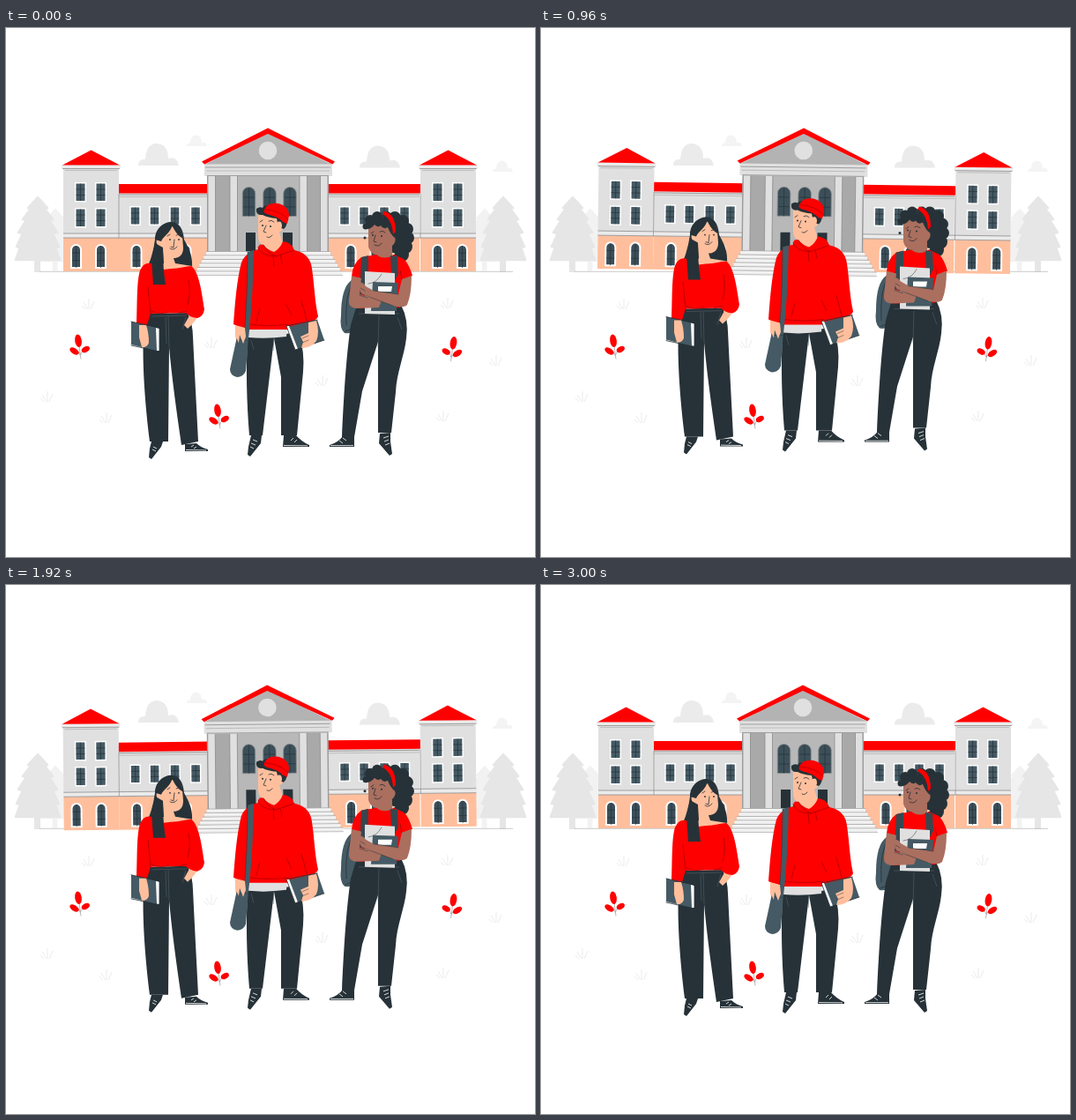
Write an HTML page that moves like this. It is 600x600 px and loops after 3040 ms.

```html
<!DOCTYPE html>
<html lang="en">
<head>
<meta charset="utf-8">
<title>Students on campus</title>
<style>
  html, body { margin: 0; width: 100%; height: 100%; overflow: hidden; background: #fff; }
  svg { display: block; width: 100%; height: 100%; }
  .ink { fill: #263238; }
  .slate { fill: #455a64; }
  .red { fill: #f00; }
  .skin { fill: #ffbf9d; }
  .brown { fill: #aa6f5f; }
  .pale { fill: #e0e0e0; }
  .white { fill: #fff; }
  .line { fill: none; stroke: #263238; stroke-width: .8; stroke-linecap: round; stroke-linejoin: round; }
  .thin { stroke-width: .5; }
  .fold { fill: none; stroke: #a30000; stroke-width: .7; stroke-linecap: round; }
  .lace { fill: none; stroke: #fff; stroke-width: .8; }
  .seam { fill: none; stroke: #53616a; stroke-width: .6; }
</style>
</head>
<body>
<svg viewBox="0 0 600 600">
  <defs>
    <g id="cloud"><path d="M150 156Q150 148 158 149Q159 131 171 131Q184 132 184 148Q194 145 196 156Z"/></g>
    <g id="tuft"><path d="M-1 6L-6 -2M0 6L0 -6M2 6L6 -3M-4 6L-8 2" fill="none" stroke="#e6e6e6" stroke-width=".8"/></g>
    <g id="sprout">
      <path d="M-1 0Q0 8 1 15M-5 6Q0 7 0 11M6 5Q1 6 1 10" fill="none" stroke="#999" stroke-width=".7"/>
      <ellipse class="red" cx="-2" cy="-5.7" rx="3.8" ry="7.3" transform="rotate(-8 -2 -5.7)"/>
      <ellipse class="red" cx="-6.5" cy="6" rx="5.8" ry="3.3" transform="rotate(32 -6.5 6)"/>
      <ellipse class="red" cx="6.3" cy="4" rx="4.9" ry="3.1" transform="rotate(-30 6.3 4)"/>
    </g>
  </defs>

  <g id="scenery"></g>
  <g id="building"></g>

  <g id="people">
    <g id="longHair">
      <path class="ink" d="M169 240C169 228 178 220 188 220C197 221 201 228 202 240C206 248 212 256 211 272L198 274L170 276L161 270Q167 256 169 240Z"/>
      <path class="skin" d="M176 236C180 230 186 225 190 225C196 225 200 231 200 236L201 249C201 257 197 261 190 261L192 267L211 270L206 280L172 280L167 271L179 267L178 250C169 250 168 235 176 237Z"/>
      <path class="ink" d="M189 222C187 233 179 235 176 242L169 240C171 227 179 219 189 222ZM188 222C195 223 200 229 201 239C196 236 190 230 188 222Z"/>
      <path class="line" d="M183 236L186 234M193 235Q195 233 198 236M191 240L190 249L187 248M186 250Q190 253 194 248"/>
      <circle class="ink" cx="186" cy="240" r=".9"/><circle class="ink" cx="196" cy="240" r=".9"/>
      <path class="ink" d="M163 324L206 323Q212 337 212 350C214 392 216 430 218 469L199 473C193 432 188 395 185 362L184 469L163 469C158 430 153 370 157 334Z"/>
      <path class="seam" d="M165 327L205 326M184 327L185 362M181 328L182 358M204 328L200 342"/>
      <path class="skin" d="M202 337L211 321L218 326Q215 333 206 341Z"/>
      <path class="red" d="M152 275Q156 265 165 267C172 276 180 274 187 273C197 273 204 270 210 270C219 276 222 300 225 319Q224 327 217 329Q207 328 202 321L206 312L205 323L164 324L160 337L148 336C149 313 148 288 152 275Z"/>
      <path class="fold" d="M164 324L161 294M206 314Q210 299 207 286M165 321Q175 326 184 322M205 321L196 323"/>
      <path class="ink" d="M169 244L178 249Q178 274 181 291L167 291L165 262Z"/>
      <path class="slate" d="M142 333L171 340L173 367L142 359Z"/>
      <path class="white" d="M170 340L174 341L174 366L171 366Z"/>
      <path class="line" d="M142 333L174 340L174 367L142 360"/>
      <path class="skin" d="M151 337L159 337Q162 346 162 357Q160 363 154 362L151 351Z"/>
      <path class="ink" d="M165 469L178 469L176 475L165 489L162 487L163 477ZM203 472L216 471Q221 476 229 478L229 480L203 480Z"/>
      <path class="lace" d="M167 475L171 477M166 478L170 480M210 475L213 473M213 477L216 475M204 478.5L227 479"/>
    </g>

    <g id="beanie">
      <path class="ink" d="M274 349L332 346Q339 367 337 390L330 462L312 462L312 396L304 352L291 462L276 462C273 425 272 386 274 349Z"/>
      <path class="seam" d="M304 352L303 366M278 354L281 365"/>
      <path class="pale" d="M275 340L319 340L318 350Q296 353 275 351Z"/>
      <path class="skin" d="M286 208L308 212Q316 215 315 225Q314 231 310 231L315 249Q305 261 293 250L292 246Q286 245 286 235Z"/>
      <path class="skin" d="M260 337L271 339L272 349L268 362Q260 357 260 348Z"/>
      <path class="red" d="M286 249Q287 244 292 246Q297 252 304 254Q311 250 314 242Q324 243 327 252C339 254 346 262 347 273C350 293 350 309 354 327Q353 332 342 334L338 338L319 342L276 342L275 334L270 342L258 336C260 309 262 285 267 266Q271 255 286 251Z"/>
      <path class="fold" d="M286 249Q289 259 306 259L327 252M292 246Q296 255 306 259M303 258L304 270M311 257L313 267M274 329L278 302M341 332Q338 319 335 309M276 336Q298 339 320 336M288 318L284 333M318 314L324 326"/>
      <path class="slate" d="M274 254L281 252Q280 310 275 352L270 352Q274 305 274 254Z"/>
      <path class="slate" d="M262 350Q267 345 275 350L272 389Q269 396 262 396Q254 394 254 387Z"/>
      <path class="line thin" d="M274 254Q274 305 270 351M262 354L274 354"/>
      <path class="skin" d="M260 337L271 340L272 350L269 358L265 348L264 357L260 349Z"/>
      <path class="slate" d="M320 339L353 331L361 354L328 365Z"/>
      <path class="white" d="M318 338L321 338L331 364L328 365Z"/>
      <path class="line" d="M353 331L318 338L328 365L361 354"/>
      <path class="skin" d="M343 334L352 332Q356 345 352 355Q346 363 335 363L337 356L334 350L343 346Z"/>
      <path class="line thin" d="M336 352L343 349M336 357L343 354"/>
      <path class="ink" d="M298 207L318 214Q320 224 315 228L309 226L307 216Q297 215 291 212Q283 213 284 205Q288 202 291 204Q293 200 299 202Z"/>
      <path class="skin" d="M308 220Q313 218 313 225Q312 230 308 229Z"/>
      <path class="red" d="M293 206Q297 197 309 199Q321 202 321 213L319 222L314 220Q309 214 296 211Q291 209 293 206Z"/>
      <path class="fold" d="M294 206Q311 207 320 217"/>
      <path class="line" d="M288 220L291 218M298 219Q301 217 304 220M295 224L292 231L295 232M296 237Q299 239 302 235"/>
      <circle class="ink" cx="291" cy="224" r="1"/><circle class="ink" cx="300" cy="225" r="1"/>
      <path class="ink" d="M278 462L290 462L289 471L277 486L274 484L275 475ZM315 462L329 462Q335 469 344 473L344 475L314 475Z"/>
      <path class="lace" d="M280 467L285 469M278 471L283 473M277 475L281 477M323 468L326 465M327 470L330 467M315 473.5L342 473.8"/>
    </g>

    <g id="curls">
      <g id="hair" class="ink"></g>
      <path class="slate" d="M392 286Q380 294 380 326Q378 341 384 346Q395 348 402 337L406 295Z"/>
      <path class="line" d="M394 288Q384 302 386 337M385 344Q394 342 401 330"/>
      <path class="brown" d="M411 225Q423 217 434 225L440 235Q444 242 438 247L438 259Q440 269 429 269Q421 269 421 258Q413 256 411 248Z"/>
      <path class="ink" d="M410 228Q407 219 417 216Q431 213 439 221L441 238Q436 234 433 226Q428 229 425 224Q422 227 418 223Q414 228 410 228Z"/>
      <path class="red" d="M429 208Q442 211 442 231L439 234Q438 217 427 211Z"/>
      <path class="line" d="M414 233L417 231M424 231Q427 229 430 232M419 235L417 242L420 243M418 246Q423 249 426 244"/>
      <circle class="ink" cx="416" cy="235" r="1"/><circle class="ink" cx="426" cy="236" r="1"/>
      <path class="ink" d="M398 314L448 314Q457 331 454 352C452 371 443 391 442 413L437 459L422 459L422 356L404 412L395 464L381 464C383 418 386 371 391 337Z"/>
      <path class="seam" d="M423 326L422 362M400 324L446 324M444 328L449 342"/>
      <path class="red" d="M403 260L420 257Q429 264 440 257L451 262Q457 267 461 281L450 286L447 317L400 318L402 284L392 282Q393 267 403 260Z"/>
      <path class="fold" d="M402 283L404 273M449 285L447 275"/>
      <path d="M403 260L411 258L411 278L404 302L401 302ZM436 258L444 259L445 279L439 290L437 280Z" fill="#37474f"/>
      <path class="pale" d="M407 276L441 278L441 325L407 324Z"/>
      <path class="line thin" d="M411 290Q421 289 426 279"/>
      <path class="slate" d="M416 288L445 289L443 321L414 321Z"/>
      <path class="white" d="M422 293L438 293L437 299L422 299Z"/>
      <path class="brown" d="M392 281L403 284L401 302L426 309L423 317L397 318Q388 317 389 309Z"/>
      <path class="brown" d="M449 285L460 281Q460 302 455 314Q451 318 439 315L404 302Q399 296 401 289Q405 288 408 293L417 298L445 302Z"/>
      <path class="line thin" d="M404 302L439 315M402 295L407 298M401 303L410 306M417 298L445 302"/>
      <path class="ink" d="M382 463L395 463L395 475L367 475L367 473Q377 470 382 463ZM424 460L436 459L436 469L438 483L435 485L423 471Z"/>
      <path class="lace" d="M382 465L386 468M378 468L382 471M368 473.6L394 473.6M428 465L434 463M429 469L434 467M430 473L435 471"/>
    </g>
  </g>
</svg>
<script>
const $ = id => document.getElementById(id);
const shape = (d, fill, extra = '') => `<path d="${d}" fill="${fill}" ${extra}/>`;
const box = (x, y, w, h, fill) => `<rect x="${x}" y="${y}" width="${w}" height="${h}" fill="${fill}"/>`;
const rule = (x1, x2, y, color = '#8c8c8c', width = .8) =>
  shape(`M${x1} ${y}H${x2}`, 'none', `stroke="${color}" stroke-width="${width}"`);
const use = (id, x, y, extra = '', flip = 1) =>
  `<use href="#${id}" transform="translate(${x} ${y}) scale(${flip} 1)" ${extra}/>`;

function tree(x, y, scale, color) {
  const half = [[0, 0], [11, 12], [8, 13], [17, 25], [13, 26], [22, 40], [17, 41], [24, 56], [20, 57], [25, 71]];
  const left = half.map(([w, h]) => [-w, h]), right = [...half].reverse();
  return `<g transform="translate(${x} ${y}) scale(${scale})">` +
    shape('M' + left.concat(right).join('L') + 'Z', color, `stroke="${color}" stroke-width="2.5" stroke-linejoin="round"`) +
    box(-4, 70, 7, 15, color) + '</g>';
}

function windowPane(cx, y, w = 10, h = 19.5) {
  return box(cx - w / 2 - 1.5, y - 1.5, w + 3, h + 3, '#fff') + box(cx - w / 2, y, w, h, '#455a64') +
    shape(`M${cx} ${y}v${h}M${cx - w / 2} ${y + h / 3}h${w}m${-w} ${h / 3}h${w}`, 'none', 'stroke="#263238" stroke-width=".7"');
}

function archPane(cx, y, w, h, frame, border = 2) {
  const r = w / 2;
  return shape(`M${cx - r} ${y + h}V${y + r}a${r} ${r} 0 0 1 ${w} 0V${y + h}Z`, '#3c4f59', `stroke="${frame}" stroke-width="${border}"`) +
    shape(`M${cx} ${y + 1}V${y + h}M${cx - r + 1} ${y + h * .35}h${w - 2}m${2 - w} ${h * .33}h${w - 2}`, 'none', 'stroke="#263238" stroke-width=".7"');
}

function tower(x) {
  let s = box(x, 158, 63, 80, '#e0e0e0') + box(x, 238, 63, 38, '#ffbf9d') +
    box(x - 2, 155, 67, 4, '#ececec') + rule(x - 1, x + 64, 159.5) + rule(x + 2, x + 61, 161.5, '#b5b5b5') +
    shape(`M${x - 1} 155.5L${x + 31.5} 138.5L${x + 64} 155.5Z`, '#f00');
  for (const y of [176.5, 205.5]) for (const dx of [19.5, 42.5]) s += windowPane(x + dx, y);
  return s;
}

function wing(x, panes, arches) {
  return box(x, 186, 104, 52, '#e0e0e0') + box(x, 238, 104, 38, '#ffbf9d') +
    shape(`M${x} 177H${x + 105}L${x + 107} 187.5H${x - 2}Z`, '#f00') + rule(x, x + 104, 189) + rule(x, x + 104, 191.5, '#b5b5b5') +
    panes.map(cx => windowPane(cx, 203.5, 9.5, 19)).join('') +
    arches.map(cx => archPane(cx, 246, 11, 26, '#fff')).join('');
}

function hall() {
  let s = box(228, 166, 138, 88, '#a9a9a9') + box(263, 168, 70, 86, '#b8b8b8');
  for (const x of [229, 254, 333, 356.5])
    s += box(x, 168, 8.5, 86, '#e0e0e0') + shape(`M${x} 168v86m8.5 -86v86`, 'none', 'stroke="#858585" stroke-width=".7"');
  for (const cx of [275.5, 299, 322]) s += archPane(cx, 180.5, 14.5, 33, '#8c8c8c', .8);
  for (const x of [272, 293, 314]) s += box(x, 232, 11, 22, '#263238');
  s += box(225, 153, 145, 15, '#e0e0e0');
  [154, 158, 162, 167.5].forEach((y, i) => s += rule(225 + i, 369 - i, y, i % 2 ? '#8c8c8c' : '#b0b0b0'));
  s += shape('M227 154L297 119L368 154Z', '#b3b3b3') + '<circle cx="297" cy="139" r="10.3" fill="#e0e0e0"/>' +
    shape('M222 151.5L297 113.5L373 151.5L370.5 154.5L297 120L225 154.5Z', '#f00');
  for (let i = 0; i < 6; i++) {
    const y = 253.5 + i * 4.5, x1 = 227 - i * 2.5, x2 = 368 + i * 2.7;
    s += box(x1, y, x2 - x1, 4.5, '#ededed') + rule(x1, x2, y, '#a6a6a6') + rule(x1, x2, y + 1.3, '#fff');
  }
  return s + rule(214, 382, 280.5, '#b5b5b5');
}

const tufts = [[94, 313], [233, 357], [47, 418], [114, 442], [359, 400], [501, 312], [556, 377], [496, 440]];
$('scenery').innerHTML =
  use('cloud', 0, 0, 'fill="#ebebeb"') + use('cloud', 251, 2.5, 'fill="#ebebeb"') +
  [[130, 56], [477, 85]].map(([x, y]) => `<use href="#cloud" transform="translate(${x} ${y}) scale(.5)" fill="#f4f4f4"/>`).join('') +
  tree(56, 206, .82, '#f2f2f2') + tree(543, 206, .82, '#f2f2f2') +
  tree(36, 192, 1, '#e6e6e6') + tree(564, 192, 1, '#e6e6e6') +
  rule(38, 575, 276.3, '#bdbdbd', .8) +
  tufts.map(([x, y]) => use('tuft', x, y)).join('') +
  use('sprout', 84, 360.5) + use('sprout', 242, 439.5) + use('sprout', 505.5, 363, '', -1);

$('building').innerHTML =
  wing(128, [146.5, 168.5, 191.5, 215], [148, 176, 204]) + wing(365, [384, 406, 429, 452], [391, 419, 446]) +
  tower(65) + tower(470) +
  [79.5, 107.5, 489.5, 517.5].map(cx => archPane(cx, 246, 11, 26, '#fff')).join('') +
  [[65, 229], [365, 533]].map(([a, b]) => box(a, 233, b - a, 5, '#ebebeb') + rule(a, b, 233) + rule(a, b, 238)).join('') +
  shape('M128 188V238M470 188V238', 'none', 'stroke="#8c8c8c" stroke-width=".7"') + hall();

const curls = [[413, 218, 6], [421, 214, 6], [432, 213, 5], [441, 215, 7], [450, 219, 7], [455, 228, 7],
  [456, 238, 7], [453, 248, 8], [449, 257, 8], [443, 262, 6], [440, 226, 14], [444, 243, 13], [408, 225, 3.5], [407, 238, 1.5]];
$('hair').innerHTML = curls.map(([x, y, r]) => `<circle cx="${x}" cy="${y}" r="${r}"/>`).join('');

const LOOP = 3040, FPS = 24, LAST = 72;
const triangle = p => 1 - Math.abs(2 * (p - Math.floor(p)) - 1);

function draw(now) {
  const frame = Math.min(LAST, Math.floor((now % LOOP + 5) * FPS / 1000));
  const p = frame / LAST;
  const sway = 2 * triangle(p + .25) - 1;
  const lift = 7.5 * triangle(2 * p);
  $('building').setAttribute('transform', `rotate(${sway} 297 198)`);
  $('people').setAttribute('transform', `translate(0 ${-lift})`);
}

const start = performance.now();
function tick() {
  draw(performance.now() - start);
  requestAnimationFrame(tick);
}
tick();
</script>
</body>
</html>
```
